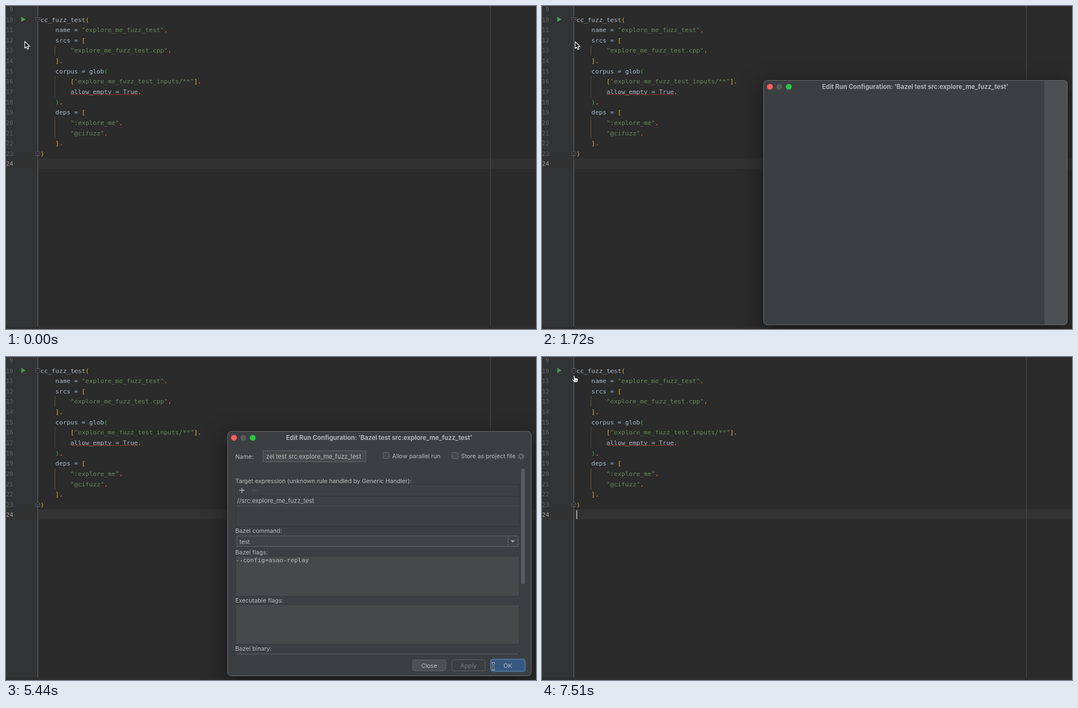
Recreate the animation shown at these times as an HTML page with a canvas. Size 958x584 px, loop 7590 ms.

```html
<!DOCTYPE html>
<html lang="en">
<head>
<meta charset="utf-8">
<title>Edit run configuration</title>
<style>
html, body { margin: 0; width: 100%; height: 100%; overflow: hidden; background: #2b2b2b; }
canvas { display: block; }
</style>
</head>
<body>
<canvas id="stage" width="958" height="584"></canvas>
<script>
const ctx = document.getElementById('stage').getContext('2d');
const LOOP = 7590;
const UI = "10.75px Inter, 'DejaVu Sans', sans-serif";
const FIELD = "11.02px Inter, 'DejaVu Sans', sans-serif";
const TITLE = "bold 11.3px Inter, 'DejaVu Sans', sans-serif";
const CODE = "11.24px 'DejaVu Sans Mono', monospace";
const NUMBER = "10.8px 'DejaVu Sans Mono', monospace";
const FLAGS = "11px 'DejaVu Sans Mono', monospace";
const CHAR = 6.768, FIRST = 10;

const source = `cc_fuzz_test(
    name = "explore_me_fuzz_test",
    srcs = [
        "explore_me_fuzz_test.cpp",
    ],
    corpus = glob(
        ["explore_me_fuzz_test_inputs/**"],
        allow_empty = True,
    ),
    deps = [
        ":explore_me",
        "@cifuzz",
    ],
)`.split('\n');

// Pointer moves: start, end, steps, target x, target y
const moves = [
  [80, 390, 5, 28, 25],
  [870, 1030, 3, 54, 50],
  [1110, 1460, 5, 60, 64.5],
  [1960, 2360, 6, 485, 376],
  [2950, 2950, 1, 484, 377],
  [3980, 4620, 9, 821, 562],
  [4870, 5190, 5, 881, 559],
  [5610, 6190, 8, 42, 44],
  [6270, 6430, 3, 36, 32],
  [6600, 6600, 1, 35.5, 27.5],
  [6930, 7090, 3, 58, 33]
];
const handTimes = [[310, 620], [6350, 6680], [7510, LOOP]];
const lineCaretTimes = [[230, 700], [6600, 6760], [7510, LOOP]];
const flagCaretTimes = [[2780, 3380], [3640, 4060], [4540, 4870]];

const during = (t, spans) => spans.some(([from, to]) => t >= from && t < to);
const lineY = n => 24.5 + 18.64 * (n - FIRST);

function rect(x, y, w, h, color) {
  ctx.fillStyle = color;
  ctx.fillRect(x, y, w, h);
}

function box(x, y, w, h, radius, fill, stroke, width = 1) {
  ctx.beginPath();
  ctx.roundRect(x, y, w, h, radius);
  if (fill) { ctx.fillStyle = fill; ctx.fill(); }
  if (stroke) { ctx.strokeStyle = stroke; ctx.lineWidth = width; ctx.stroke(); }
}

function shadowBox(x, y, w, h, radius, fill, blur, offset) {
  ctx.save();
  ctx.shadowColor = 'rgba(0,0,0,.5)';
  ctx.shadowBlur = blur;
  ctx.shadowOffsetY = offset;
  box(x, y, w, h, radius, fill);
  ctx.restore();
}

function text(str, x, middle, color = '#bbbbbb', font = UI, align = 'left') {
  ctx.font = font;
  ctx.textAlign = align;
  ctx.fillStyle = color;
  ctx.fillText(str, x, middle + 4);
}

function shape(path, x, y, fill, stroke, width = 1) {
  ctx.save();
  ctx.translate(x, y);
  const p = new Path2D(path);
  if (fill) { ctx.fillStyle = fill; ctx.fill(p); }
  if (stroke) {
    ctx.strokeStyle = stroke;
    ctx.lineWidth = width;
    ctx.lineJoin = 'round';
    ctx.stroke(p);
  }
  ctx.restore();
}

function dot(x, y, r, color) {
  ctx.beginPath();
  ctx.arc(x, y, r, 0, Math.PI * 2);
  ctx.fillStyle = color;
  ctx.fill();
}

function tokenColor(token, n) {
  if (token[0] === '"') return '#6a8759';
  if (token === ',') return '#cc7832';
  if (/[()]/.test(token) && n > FIRST && n < 23) return '#54a857';
  return /[()[\]]/.test(token) ? '#e8ba36' : '#a9b7c6';
}

function drawEditor(t) {
  rect(0, 0, 958, 584, '#2b2b2b');
  rect(0, 0, 57, 584, '#313335');
  rect(0, 275.5, 958, 18.5, '#323232');
  rect(875, 0, 1, 584, '#4d4d4d');
  rect(57, 0, 1, 584, '#606060');
  rect(0, 579.5, 958, 4.5, '#2e2d2d');

  for (let n = 9; n <= 24; n++)
    text(n, 13, lineY(n), n === 24 ? '#a4a3a3' : '#606366', NUMBER, 'right');

  for (const [from, to, color] of [[13, 13, '#5f5339'], [16, 17, '#434a43'], [20, 21, '#6a5433']])
    rect(88, lineY(from) - 9.5, 1, (to - from + 1) * 18.64, color);

  source.forEach((line, i) => {
    const n = FIRST + i;
    for (const match of line.matchAll(/"[^"]*"|[,()[\]]|[^",()[\]\s]+/g))
      text(match[0], 62.3 + match.index * CHAR, lineY(n), tokenColor(match[0], n), CODE);
  });

  let wave = 'M0 1';
  for (let x = 2; x <= 122; x += 2) wave += `L${x} ${x % 4 ? -1 : 1}`;
  shape(wave, 117, 160, null, '#bc3f3c', 0.8);

  shape('M0 0L8 4.7L0 9.4Z', 27.5, 19.5, '#499c54');
  shape('M-3.5-4H3.5V1.5L0 4.5L-3.5 1.5ZM-2-.5H2', 57.5, 25, '#2b2b2b', '#66686a', 0.9);
  shape('M-3.5 4H3.5V-1.5L0-4.5L-3.5-1.5ZM-2 .8H2', 57.5, 266.5, '#2b2b2b', '#66686a', 0.9);
  if (during(t, lineCaretTimes)) rect(62, 277, 1.6, 16, '#bbbbbb');
}

function drawMenu(x, y, pointer) {
  shadowBox(x, y, 253, 63, 0, '#3c3f41', 12, 4);
  box(x + 0.5, y + 0.5, 252, 62, 0, null, '#515354');
  const hovered = Math.floor((pointer.y - y - 4.5) / 18);
  const labels = ["Run 'Bazel test src:explo...'", "Run 'Bazel test src:explo...' with Coverage", 'Modify Run Configuration...'];
  labels.forEach((label, row) => {
    const active = row === hovered;
    if (active) rect(x + 1, y + 4.5 + row * 18, 251.5, 18, '#2f65ca');
    const color = active ? '#ffffff' : '#bbbbbb';
    text(label, x + 28, y + 13.5 + row * 18, color);
    if (row === 0) text('⌃⇧R', x + 245, y + 13.5, color, UI, 'right');
  });
  shape('M0 0L9 4.6L0 9.2Z', x + 13, y + 9, '#499c54');
  shape('M0 1L4.5-.5L9 1V5Q8 8.5 4.5 10.5Q1 8.5 0 5Z', x + 11, y + 26.5, '#afb1b3');
  shape('M4.5 1.2V9Q7 7 7.5 4.5V2Z', x + 11, y + 26.5, '#5c6770');
  shape('M0 0L6 3.5L0 7Z', x + 17.5, y + 31, '#499c54', hovered === 1 ? '#2f65ca' : '#3c3f41', 0.8);
}

function button(label, x, fill, border, color = '#bbbbbb') {
  box(x + 0.5, 547.5, 60, 20, 3, fill, border);
  text(label, x + 30.5, 557.7, color, UI, 'center');
}

function drawForm(t) {
  text('Name:', 414.5, 179.5);
  box(464.5, 169.5, 186, 20, 0, '#45494a', '#646464');
  if (t < 2780) {
    box(463.5, 168.5, 188, 22, 2, null, '#466d94', 2);
    if (t < 2280) rect(645, 172, 1, 15, '#bbbbbb');
  }
  text('zel test src:explore_me_fuzz_test', 470, 179.5, '#bbbbbb', FIELD);

  for (const [x, label] of [[681.5, 'Allow parallel run'], [806, 'Store as project file']]) {
    box(x, 172.5, 11, 11, 1.5, '#43494a', '#6b6b6b');
    text(label, x + 16.5, 178.8);
  }
  ctx.setLineDash([2, 1.9]);
  ctx.beginPath();
  ctx.arc(931, 179.7, 5, 0, Math.PI * 2);
  ctx.strokeStyle = '#6e7073';
  ctx.lineWidth = 1.6;
  ctx.stroke();
  ctx.setLineDash([]);
  ctx.beginPath();
  ctx.arc(931, 179.7, 3.2, 0, Math.PI * 2);
  ctx.stroke();
  box(931.3, 202, 6.4, 208.5, 2, '#595b5d');

  text('Target expression (unknown rule handled by Generic Handler):', 414.5, 223.7);
  box(415.5, 230.5, 512, 76, 0, '#3d4042', '#34373a');
  rect(415, 251, 513, 1, '#34373a');
  rect(415, 269, 513, 1, '#4b4e50');
  shape('M-4.5 0H4.5M0-4.5V4.5', 426.5, 241, null, '#afb1b3', 1.5);
  shape('M-4.5 0H4.5', 448.5, 241, null, '#5e6062', 1.5);
  text('//src:explore_me_fuzz_test', 417.5, 260, '#bbbbbb', FIELD);

  text('Bazel command:', 414.5, 314.3);
  box(417.5, 323.5, 508, 19, 0, '#3f4345', '#646464');
  rect(907, 324, 1, 18, '#646464');
  shape('M-4-2H4L0 2.5Z', 916, 333.3, '#9a9c9e');
  text('test', 422, 333.5);

  for (const [label, y] of [['Bazel flags:', 360], ['Executable flags:', 447]]) {
    text(label, 414.5, y - 7);
    box(415.5, y + 0.5, 512, 72, 0, '#45494a', '#35383a');
  }
  const typed = t >= 3640;
  if (typed) text('--config=asan-replay', 415, 367.3, '#bbbbbb', FLAGS);
  if (during(t, flagCaretTimes)) rect(typed ? 547.5 : 415, 360.5, 1, 14.5, '#bbbbbb');

  text('Bazel binary:', 414.5, 527.3);
  rect(417, 536.5, 509, 1, '#646464');

  const applied = t >= 4790;
  const canApply = t >= 3720 && !applied;
  button(applied ? 'Close' : 'Cancel', 734.5, '#4c5052', '#5e6060');
  button('Apply', 805.5, canApply ? '#4c5052' : '#3c3f41', '#5e6060', canApply ? '#bbbbbb' : '#777777');
  button('OK', 876.5, '#365880', '#4c708c');
  if (applied) box(876, 546.5, 62.5, 22, 4, null, '#466d94', 2);
}

function drawDialog(t) {
  shadowBox(400, 134, 550, 443, 7, '#3c3f41', 40, 12);
  if (t < 1790) box(908, 134.5, 42, 442, [0, 7, 7, 0], '#4c5052');
  box(400.5, 134.5, 549, 442, 7, null, '#66696b');
  ['#ff5f57', '#59595b', '#28c840'].forEach((color, i) => dot(412 + i * 17, 146, 5.3, color));
  text("Edit Run Configuration: 'Bazel test src:explore_me_fuzz_test'", 674.5, 145.7, '#afb1b3', TITLE, 'center');
  if (t >= 1790) drawForm(t);
}

function pointerAt(t) {
  let x = 34, y = 64;
  for (const [start, end, steps, toX, toY] of moves) {
    if (t < start) break;
    const step = Math.floor((t - start) / (end - start || 1) * (steps - 1) + 0.2) + 1;
    const p = Math.min(step / steps, 1);
    const eased = p * p * (3 - 2 * p);
    x += (toX - x) * eased;
    y += (toY - y) * eased;
  }
  return { x, y };
}

function drawPointer(t, { x, y }) {
  if (during(t, handTimes)) {
    shape('M-1.3 1.2Q0-.8 1.3 1L2 5Q3.4 4 4.4 5.2Q5.8 4.4 6.4 6Q7.5 6 7.3 8.5Q7 11 6 13H.2Q-2 11-4 8Q-4.3 6.2-2.4 6.8L-.5 8.2Z',
      x, y, '#ffffff', '#000000', 0.9);
    shape('M2.2 8.5V11M4.3 8.5V11', x, y, null, '#000000', 0.7);
  } else if (during(t, [[2360, 5520]])) {
    const beam = 'M-2.8-6Q-.3-6 0-4.4Q.3-6 2.8-6M0-4.4V4.4M-2.8 6Q-.3 6 0 4.4Q.3 6 2.8 6M-1.5 1.5H1.5';
    shape(beam, x, y, null, '#ffffff', 2.5);
    shape(beam, x, y, null, '#000000', 1.2);
  } else {
    shape('M0 0V12.3L2.8 9.7L4.8 14L6.9 13.1L5 8.9H8.8Z', x, y, '#000000', '#ffffff', 1.2);
  }
}

function draw(now) {
  const t = now % LOOP;
  const pointer = pointerAt(t);
  drawEditor(t);
  if (during(t, [[620, 1640]])) drawMenu(28, 21, pointer);
  if (during(t, [[6680, 7440]])) drawMenu(35, 23.5, pointer);
  if (during(t, [[1720, 5520]])) drawDialog(t);
  drawPointer(t, pointer);
}

const began = performance.now();
function tick() {
  draw(performance.now() - began);
  requestAnimationFrame(tick);
}
tick();
</script>
</body>
</html>
```
